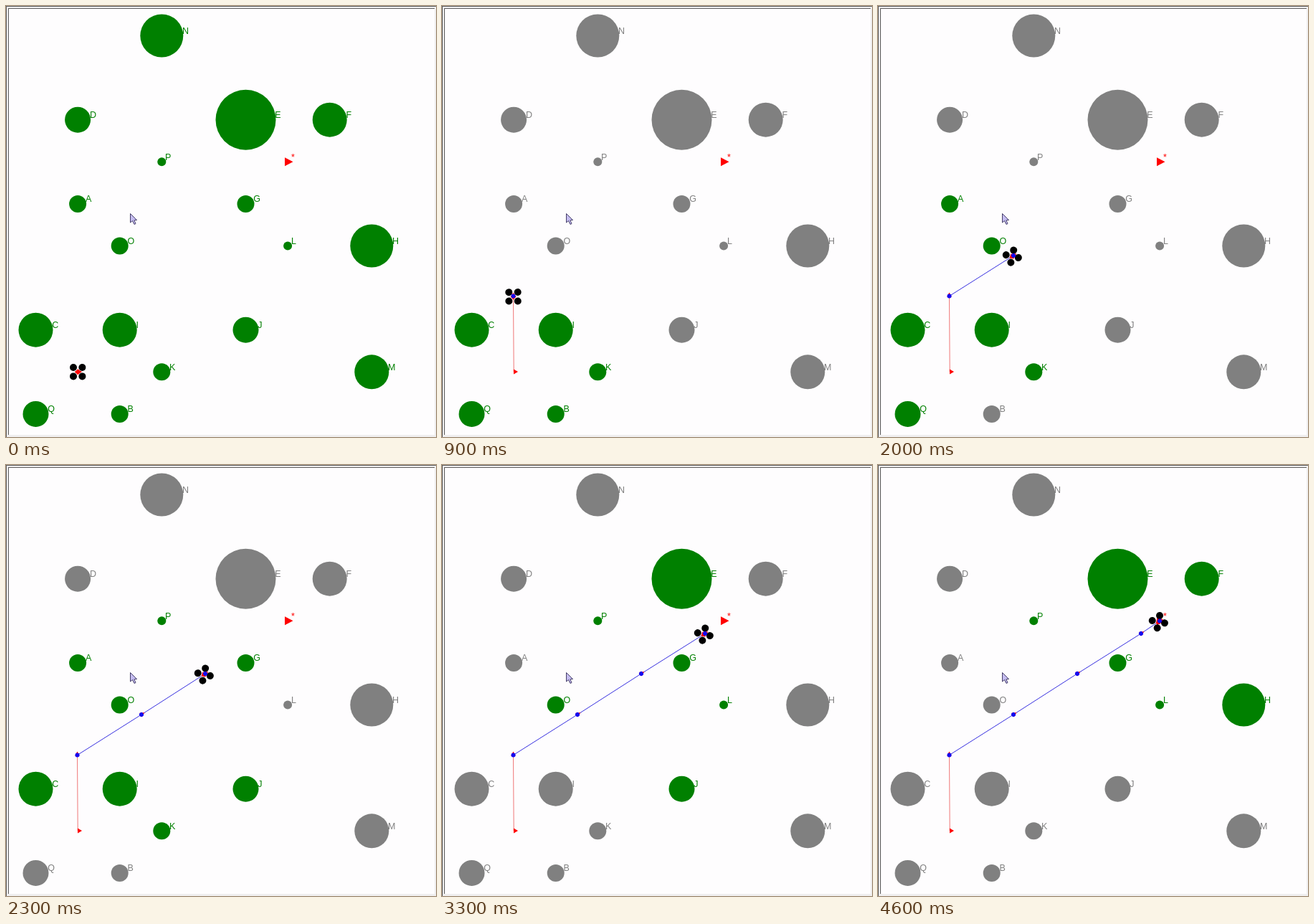
These frames come from a looping animation (600x601 px, 4.8 s). An HTML page with a canvas:

```html
<!DOCTYPE html>
<html>
<head>
<meta charset="utf-8">
<style>
html, body { margin: 0; height: 100%; overflow: hidden; background: #fefdfe; }
canvas { display: block; }
</style>
</head>
<body>
<canvas width="600" height="601"></canvas>
<script>
const g = document.querySelector('canvas').getContext('2d');
const LOOP = 4800, FIRST = 300, STEP = 1000;
const grid = n => 41.5 + 58.6 * n;

// label, column, row, radius
const obstacles = [
  ['N', 3, 0, 30], ['D', 1, 2, 18], ['E', 5, 2, 42], ['F', 7, 2, 24],
  ['P', 3, 3, 6], ['A', 1, 4, 12], ['G', 5, 4, 12], ['O', 2, 5, 12],
  ['L', 6, 5, 6], ['H', 8, 5, 30], ['C', 0, 7, 24], ['I', 2, 7, 24],
  ['J', 5, 7, 18], ['K', 3, 8, 12], ['M', 8, 8, 24], ['Q', 0, 9, 18],
  ['B', 2, 9, 12]
];
// obstacles in sensor range at each stop
const seen = ['NDEFPAGOLHCIJKMQB', 'CIKQB', 'CIKQAO', 'APGOCIJK', 'PEGOLJ', 'PEGLHF'];
const stops = [[100.2, 510.2], [99.5, 404.5], [189, 348], [278, 291], [367, 235], [393, 217.5]];

const headingTo = i => i ? Math.atan2(stops[i][1] - stops[i - 1][1], stops[i][0] - stops[i - 1][0]) : 0;

function poly(points, fill) {
  g.beginPath();
  points.forEach(p => g.lineTo(...p));
  g.closePath();
  g.fillStyle = fill;
  g.fill();
}

function dot(x, y, r, fill) {
  g.beginPath();
  g.arc(x, y, r, 0, 2 * Math.PI);
  g.fillStyle = fill;
  g.fill();
}

function line(a, b, color) {
  g.beginPath();
  g.moveTo(...a);
  g.lineTo(...b);
  g.strokeStyle = color;
  g.lineWidth = 1;
  g.stroke();
}

function placed(x, y, angle, paint) {
  g.save();
  g.translate(x, y);
  g.rotate(angle);
  paint();
  g.restore();
}

function label(text, x, y, r, color) {
  g.fillStyle = color;
  g.fillText(text, x + r - 1.2, y - 2.5);
}

function frame() {
  g.fillStyle = '#fefdfe';
  g.fillRect(0, 0, 600, 601);
  g.fillStyle = '#f0eff0';
  g.fillRect(0, 0, 600, 3);
  g.fillRect(0, 0, 3, 601);
  g.fillRect(598, 0, 2, 601);
  g.fillRect(0, 598, 600, 3);
  g.fillStyle = '#5c5c5c';
  g.fillRect(0, 0, 600, 1);
  g.fillRect(0, 0, 1, 601);
  g.fillRect(3, 3, 595, 1);
  g.fillRect(3, 3, 1, 595);
}

function cursor() {
  poly([[173.5, 289.5], [173.5, 302], [176.5, 299.5], [179, 304.5],
        [181, 303.5], [178.8, 298.8], [182.5, 298.5]], '#c4bcf0');
  g.strokeStyle = '#47406a';
  g.lineWidth = 1;
  g.stroke();
}

function drone(stop) {
  const angle = headingTo(stop), back = stop > 1 ? 2 : stop ? 0.8 : 0;
  const [x, y] = stops[stop];
  placed(x - back * Math.cos(angle), y - back * Math.sin(angle), angle, () => {
    for (const dx of [-6.2, 6.2])
      for (const dy of [-6.2, 6.2]) dot(dx, dy, 5, '#000');
    poly([[-4.5, 0], [0, -4], [4.5, 0], [0, 4]], '#f00');
  });
}

function draw(t) {
  const stop = t < FIRST ? 0 : 1 + Math.floor((t - FIRST) / STEP);
  frame();
  g.font = '12.5px "Liberation Sans", Arial, sans-serif';
  for (const [name, col, row, r] of obstacles) {
    const x = grid(col), y = grid(row);
    const color = seen[stop].includes(name) ? '#008000' : '#808080';
    dot(x, y, r, color);
    label(name, x, y, r, color);
  }

  // goal
  const gx = grid(6), gy = grid(3);
  poly([[389, gy - 6], [400.5, gy], [389, gy + 6]], '#f00');
  label('*', gx, gy, 6, '#f00');

  for (let i = 1; i <= stop; i++) line(stops[i - 1], stops[i], i > 1 ? '#3a32e0' : '#f07878');
  poly([[100, 506.5], [106, 510], [100, 513.5]], '#f00');
  for (let i = 1; i <= stop; i++) {
    if (i === stop) drone(i);
    placed(...stops[i], headingTo(i), () => {
      poly([[-1, -3.3], [5, 0], [-1, 3.3]], '#f00');
      dot(0, 0, 3, '#1408f0');
    });
  }
  if (!stop) drone(0);
  cursor();
}

function tick() {
  draw(performance.now() % LOOP);
  requestAnimationFrame(tick);
}
tick();
</script>
</body>
</html>
```
